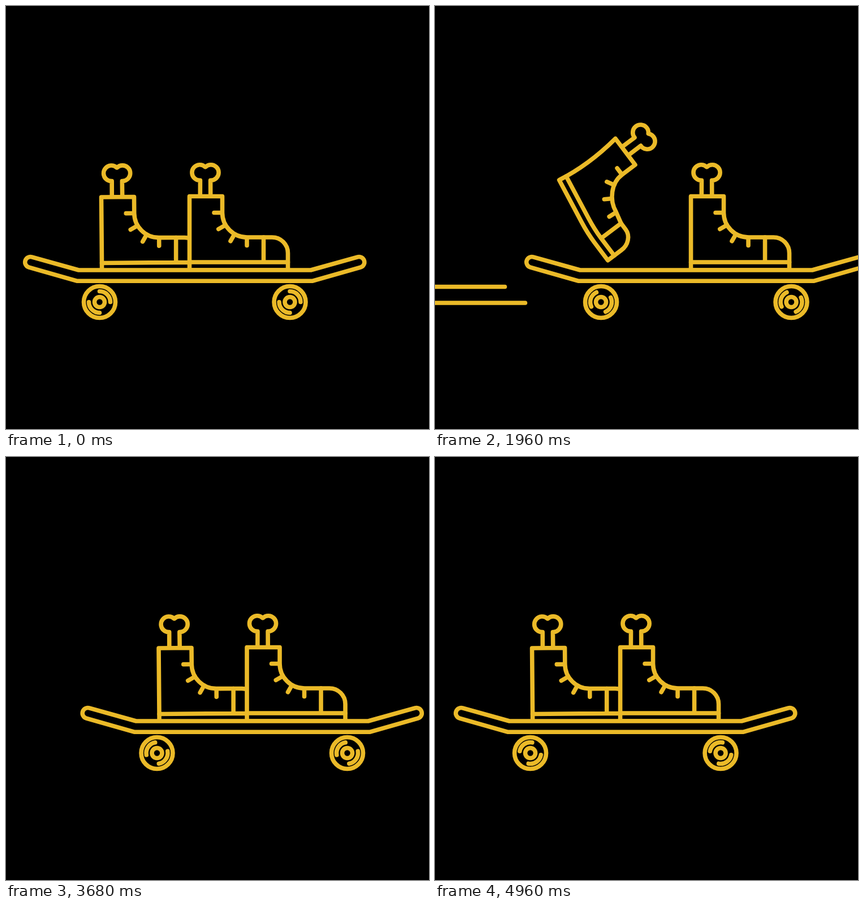
Write an HTML page with a canvas that moves like this. It is 748 by 748 pixels and loops after 5 s.

```html
<!DOCTYPE html>
<html lang="en">
<head>
<meta charset="utf-8">
<title>Skating boots</title>
<style>
html, body { margin: 0; height: 100%; overflow: hidden; background: #000; }
canvas { display: block; width: 100vw; height: 100vh; }
</style>
</head>
<body>
<canvas width="748" height="748"></canvas>
<script>
const ctx = document.querySelector('canvas').getContext('2d');
const LOOP = 5000, STEP = 40, RAD = Math.PI / 180;

// Kicking leg: time, x and y of the shaft corner on the board, shaft angle
const REST = [168.5, 338, -0.5];
const KICK = [
  [640, ...REST],
  [1180, 195, 272, 26],     // lift
  [1320, 188, 320, 30.5],
  [1500, 110, 342, 44],     // push
  [1960, 191, 234.5, 53],
  [2240, 205, 190, 40],     // lift
  [2480, 109.5, 294, 51],
  [2640, 45, 335, 54],      // push
  [2960, 110, 234, 50],
  [3320, ...REST]
];

const mix = (a, b, k) => a + (b - a) * k;
const ramp = (t, from, to) => Math.min(1, Math.max(0, (t - from) / (to - from)));
const ease = (t, from, to) => {
  const k = ramp(t, from, to);
  return k * k * (3 - 2 * k);
};

// Monotone cubic through column c of the keys, never overshooting them
function curve(keys, t, c) {
  let i = 0;
  while (i < keys.length - 2 && t >= keys[i + 1][0]) i++;
  const [a, b] = [keys[i], keys[i + 1]];
  const k = ramp(t, a[0], b[0]);
  const slope = j => keys[j] && keys[j + 1]
    ? (keys[j + 1][c] - keys[j][c]) / (keys[j + 1][0] - keys[j][0]) : 0;
  const tangent = j => {
    const p = slope(j - 1), q = slope(j);
    return p * q > 0 ? 2 * p * q / (p + q) : 0;
  };
  return mix(a[c], b[c], ease(t, a[0], b[0]))
    + (b[0] - a[0]) * k * (1 - k) * (tangent(i) * (1 - k) - tangent(i + 1) * k);
}

// Each push carries the board forward, then it drifts back
function boardShift(t) {
  if (t < 1320) return -0.038 * t;
  if (t < 1845) return mix(-50, 131.5, ease(t, 1320, 1845));
  if (t < 2500) return 131.5 - 0.03 * (t - 1845);
  if (t < 3000) return mix(112, 153.5, ease(t, 2500, 3000));
  return 0.0769 * (LOOP - t);
}

// The wheels turn one degree per millisecond, faster while pushing
const wheelAngle = t => 135 + t + 180 * ramp(t, 1320, 2680);

function rotate(x, y, deg) {
  const c = Math.cos(deg * RAD), s = Math.sin(deg * RAD);
  return [x * c - y * s, x * s + y * c];
}

function paint() {
  ctx.fill();
  ctx.stroke();
}

function bone(x, y, angle) {
  ctx.save();
  ctx.translate(x, y);
  ctx.rotate(angle * RAD);
  ctx.beginPath();
  ctx.moveTo(18.8, 0);
  ctx.arc(18.2, -42, 13.8, 87 * RAD, 315 * RAD);
  ctx.arc(37.8, -42, 13.8, 225 * RAD, 453 * RAD);
  ctx.lineTo(37.2, 0);
  paint();
  ctx.restore();
}

// The further the shaft leans, the more the foot and toe flex
function boot(x0, y0, shaft) {
  const lean = shaft / 53, flex = 9 * lean ** 3;
  const foot = shaft + flex, toe = 53 * lean ** 2;
  const add = (p, q) => [p[0] + q[0], p[1] + q[1]];
  const ankle = add([x0, y0], rotate(44, 118.5, shaft));
  const ball = add(ankle, rotate(63, 12, foot));
  // w blends the parts: 0 shaft, 1 foot, 2 toe
  const at = ([x, y, w]) => {
    const parts = [
      add([x0, y0], rotate(x, y + 130.5, shaft)),
      add(ankle, rotate(x - 44, y + 12, foot)),
      add(ball, rotate((x - 107) * (1 - flex / 80), y, toe))
    ];
    const i = Math.min(1, Math.floor(w));
    return [0, 1].map(n => mix(parts[i][n], parts[i + 1][n], w - i));
  };
  const move = (...p) => ctx.moveTo(...at(p));
  const line = (...p) => ctx.lineTo(...at(p));
  const quad = (p, q) => ctx.quadraticCurveTo(...at(p), ...at(q));
  const cubic = (p, q, r) => ctx.bezierCurveTo(...at(p), ...at(q), ...at(r));

  bone(x0, y0, shaft);

  ctx.beginPath();
  move(0, -130.5, 0);
  line(58, -130.5, 0);
  line(58, -101.5, 0);
  cubic([58, -77.5, 0], [77.5, -58, 0.3], [101.5, -58, 0.5]);
  line(131, -58, 2);
  line(146, -58, 2);
  cubic([161.5, -58, 2], [174, -45.5, 2], [174, -30, 2]);
  line(174, 0, 2);
  line(130, 0, 2);
  quad([107, 0, 1], [84, 0, 1]);
  line(0, 0, 1);
  quad([flex, -65, 0], [0, -130.5, 0]);
  ctx.closePath();
  paint();

  ctx.beginPath();
  move(174, -14, 2);
  line(130, -14, 2);
  quad([107, -14, 1], [84, -14, 1]);
  line(0, -14, 1);
  move(131, -58, 2); line(131, -14, 2);
  // Laces fan out around the centre of the instep curve
  for (let i = 0; i < 4; i++) {
    const [dx, dy] = rotate(-1, 0, -30 * i), w = i * i / 18;
    move(101.5 + 58 * dx, -101.5 + 58 * dy, w);
    line(101.5 + 44 * dx, -101.5 + 44 * dy, w);
  }
  ctx.stroke();
}

function deck() {
  const tilt = 15.3;
  ctx.beginPath();
  ctx.moveTo(128.5, 467);
  ctx.lineTo(539, 467);
  ctx.arc(624.3, 453, 9.5, (-90 - tilt) * RAD, (90 - tilt) * RAD);
  ctx.lineTo(541.5, 486.3);
  ctx.lineTo(126, 486.3);
  ctx.arc(43.2, 453, 9.5, (90 + tilt) * RAD, (270 + tilt) * RAD);
  ctx.closePath();
  paint();
}

function wheel(x, angle) {
  const arc = (r, from, to) => {
    ctx.beginPath();
    ctx.arc(x, 523.5, r, from * RAD, to * RAD);
    ctx.stroke();
  };
  arc(28, 0, 360);
  arc(9, 0, 360);
  arc(19, angle - 45, angle + 45);
  arc(19, angle + 135, angle + 225);
}

function streaks(t) {
  const exit = ease(t, 2760, 3240);
  const end = mix(-20, 123.5, ease(t, 1640, 1960)) + 0.045 * (t - 1960) - 240 * exit;
  const length = 145 + Math.max(0, 2480 - t) * 0.05;
  for (const [x, y] of [[end, 496.5], [end + 36 * (1 - exit), 525]]) {
    if (t < 1640) continue;
    ctx.beginPath();
    ctx.moveTo(x - length, y);
    ctx.lineTo(x, y);
    ctx.stroke();
  }
}

function draw(t) {
  ctx.fillStyle = '#000';
  ctx.fillRect(0, 0, 748, 748);
  ctx.strokeStyle = '#ebba28';
  ctx.lineWidth = 7.6;
  ctx.lineCap = ctx.lineJoin = 'round';
  if (t < 3240) streaks(t);
  ctx.save();
  ctx.translate(boardShift(t), 0);
  boot(...[1, 2, 3].map(c => curve(KICK, t, c)));
  boot(324.5, 336.5, 0);
  deck();
  for (const x of [165.5, 502]) wheel(x, wheelAngle(t));
  ctx.restore();
}

function tick() {
  draw(Math.floor(performance.now() % LOOP / STEP) * STEP);
  requestAnimationFrame(tick);
}
tick();
</script>
</body>
</html>
```
